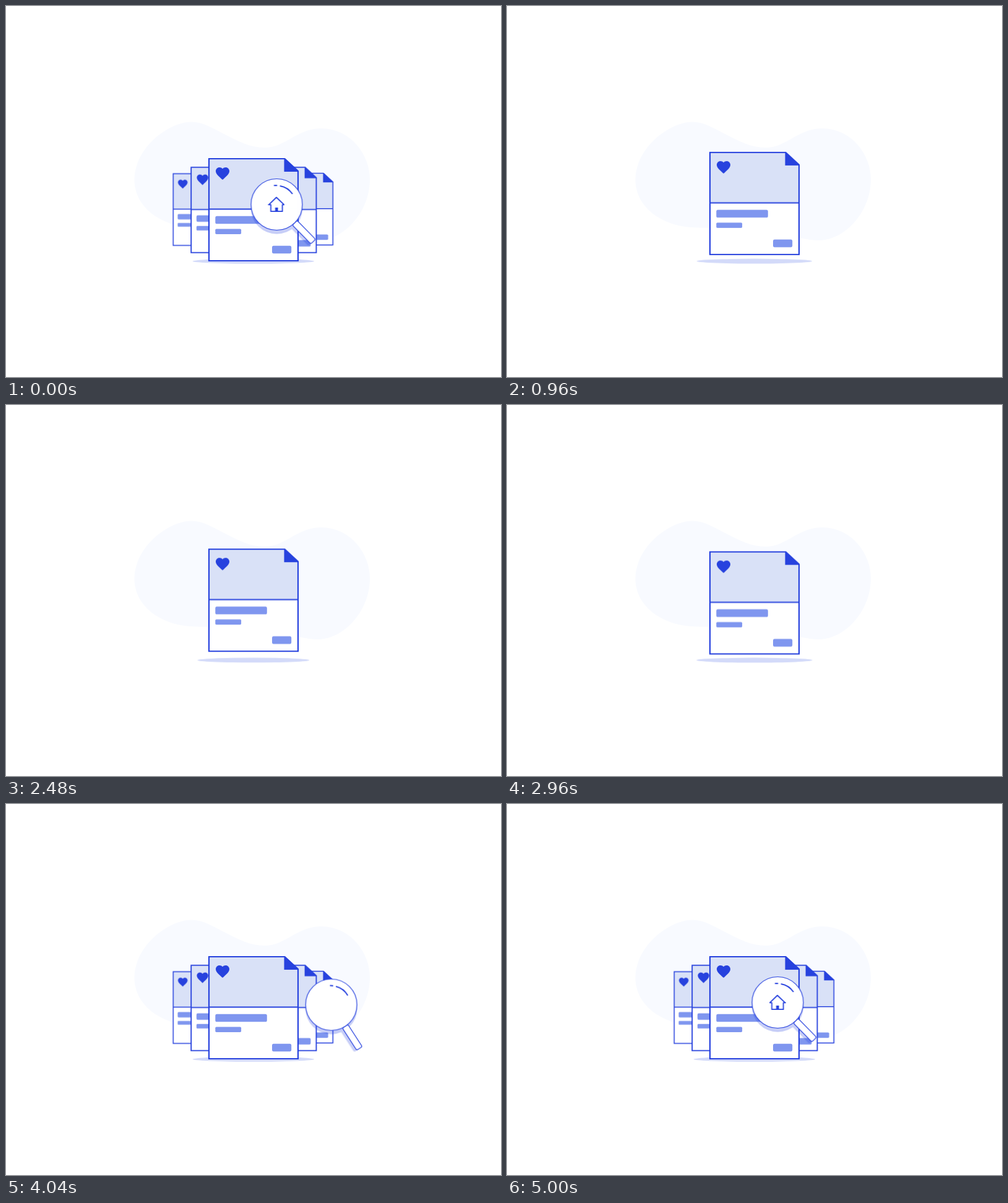
Recreate the animation shown at these times as an HTML page without scripts. Size 800 px wide and 600 px high, loop 6200 ms.

```html
<!DOCTYPE html>
<html lang="en">
<head>
<meta charset="utf-8">
<title>Searching homes</title>
<style>
  html, body { margin: 0; width: 100%; height: 100%; overflow: hidden; background: #fff; }
  svg { display: block; width: 100%; height: 100%; }

  .ink { fill: #2742de; }
  .line { fill: none; stroke: #2742de; }
  .bar { fill: #7f96ef; }
  .paper { fill: #fff; }

  .move { animation: 6200ms ease-in-out infinite; }
  .float { animation-name: float; }
  .ground { animation-name: ground; transform-origin: 399.8px 412.7px; }
  .fan { animation-name: fan; }
  .lens { animation-name: travel; }
  .fade { animation-name: fade; }
  .turn { animation-name: turn; }
  .glint { animation-name: glint; }
  .house { animation-name: house; }
  .cover { animation-name: cover; animation-timing-function: step-end; }

  @keyframes float {
    0%, 51.1%, 100% { transform: translateY(0); }
    3.55% { transform: translateY(-28px); }
    16.3% { transform: translateY(-10px); }
    30.5% { transform: translateY(-20px); }
    47.1% { transform: translateY(-10px); }
  }
  @keyframes ground {
    0%, 51.1%, 100% { transform: scale(1); }
    3.55% { transform: scale(.8, .9); }
    16.3% { transform: scale(.951, .97); }
    30.5% { transform: scale(.865, .92); }
    47.1% { transform: scale(.951, .97); }
  }
  /* --in is the way from the open place to behind the front card */
  @keyframes fan {
    0%, 53%, 100% { transform: translateX(0); }
    4.5% { transform: translateX(var(--in)); }
    47.1% { transform: translateX(var(--in)); animation-timing-function: cubic-bezier(.3, 0, .3, 1); }
  }
  @keyframes travel {
    0%, 80.65%, 100% { transform: translate(437.5px, 321px); }
    4%, 51.6% { transform: translate(433px, 318px); }
    62.3% { transform: translate(528px, 324.7px); animation-timing-function: cubic-bezier(.6, 0, .55, 1); }
  }
  @keyframes turn {
    0%, 80.65%, 100% { transform: rotate(45.5deg); }
    4%, 51.6% { transform: rotate(27deg); }
    62.3% { transform: rotate(57.5deg); animation-timing-function: cubic-bezier(.6, 0, .55, 1); }
  }
  @keyframes glint {
    0%, 80.65%, 100% { transform: rotate(0deg); }
    4%, 51.6% { transform: rotate(14deg); }
    62.3% { transform: rotate(4.6deg); animation-timing-function: cubic-bezier(.6, 0, .55, 1); }
  }
  @keyframes fade {
    0%, 58%, 100% { opacity: 1; }
    4%, 51.6% { opacity: 0; }
  }
  @keyframes house {
    0%, 78%, 100% { opacity: 1; }
    4%, 71% { opacity: 0; }
  }
  @keyframes cover {
    0% { visibility: hidden; }
    51.6% { visibility: visible; }
    62.4%, 100% { visibility: hidden; }
  }
</style>
</head>
<body>
<svg viewBox="0 0 800 600">
  <defs>
    <g id="card">
      <path class="paper" d="M0 0H122.5L144 20V165H0Z"/>
      <path fill="#d9e1f7" d="M0 0H122.5L144 20V81.5H0Z"/>
      <path class="line" stroke-width="2.2" d="M0 0H122.5L144 20V165H0ZM0 81.5H144"/>
      <path class="ink" d="M121.5 0H123L144.8 20V21H121.5Z"/>
      <path class="ink" transform="translate(8.8 10.6) scale(1.1)" d="M12 21.35l-1.45-1.32C5.4 15.36 2 12.28 2 8.5 2 5.42 4.42 3 7.5 3c1.74 0 3.41.81 4.5 2.09C13.09 3.81 14.76 3 16.5 3 19.58 3 22 5.42 22 8.5c0 3.78-3.4 6.86-8.55 11.54L12 21.35z"/>
      <rect class="bar" x="10.3" y="92.8" width="83.5" height="12.5" rx="2.6"/>
      <rect class="bar" x="10.3" y="113.5" width="41.8" height="8.5" rx="1.8"/>
      <rect class="bar" x="102" y="140.7" width="31.2" height="12.5" rx="2.6"/>
    </g>
    <rect id="handle" x="41.5" y="-5.4" width="42.7" height="10.8" rx="2.4"/>
  </defs>

  <path fill="#f8faff" d="M207.5 281C207.5 230 262 187.5 300 187.5C335 187.5 372 229 418 229C452 229 470 198 510 198C553 198 588 236 588 281C588 333 546 379 504 379C470 379 440 358.5 310 358.5C250 358.5 207.5 325 207.5 281Z"/>
  <ellipse class="move ground" cx="399.8" cy="412.7" rx="98.3" ry="4.1" fill="#d3daf9"/>

  <g class="move float">
    <g class="move fan" style="--in: 79px"><use href="#card" transform="translate(270.2 271.2) scale(.703)"/></g>
    <g class="move fan" style="--in: -79px"><use href="#card" transform="translate(427 270.5) scale(.703)"/></g>
    <g class="move fan" style="--in: 41px"><use href="#card" transform="translate(299.2 260.9) scale(.836)"/></g>
    <g class="move fan" style="--in: -41px"><use href="#card" transform="translate(381 260.9) scale(.836)"/></g>
    <use href="#card" x="328" y="247"/>
  </g>

  <g class="move fade">
    <g class="move lens">
      <g class="ink" opacity=".26">
        <circle cy="6" r="41.8"/>
        <g transform="translate(-4 3)"><g class="move turn"><use href="#handle"/></g></g>
      </g>
      <g fill="#fff" stroke="#2742de" stroke-width="1.2">
        <g class="move turn"><use href="#handle"/></g>
        <circle r="41.5"/>
      </g>
      <path class="move glint line" stroke-width="2" d="M-4.5 -30.7L.7 -30.8M5.3 -30.1A30.6 30.6 0 0 1 25.5 -17"/>
      <g class="move house">
        <path class="line" stroke-width="1.8" stroke-linejoin="round" d="M-.5 -11.5L-12.8 .4H-9.5V11.2H9.2V.4H12Z"/>
        <rect class="ink" x="-2.5" y="5" width="4.6" height="6.2"/>
      </g>
    </g>
  </g>

  <!-- keeps the lens behind the front card on its way out -->
  <g class="move cover"><use href="#card" x="328" y="247"/></g>
</svg>
</body>
</html>
```
